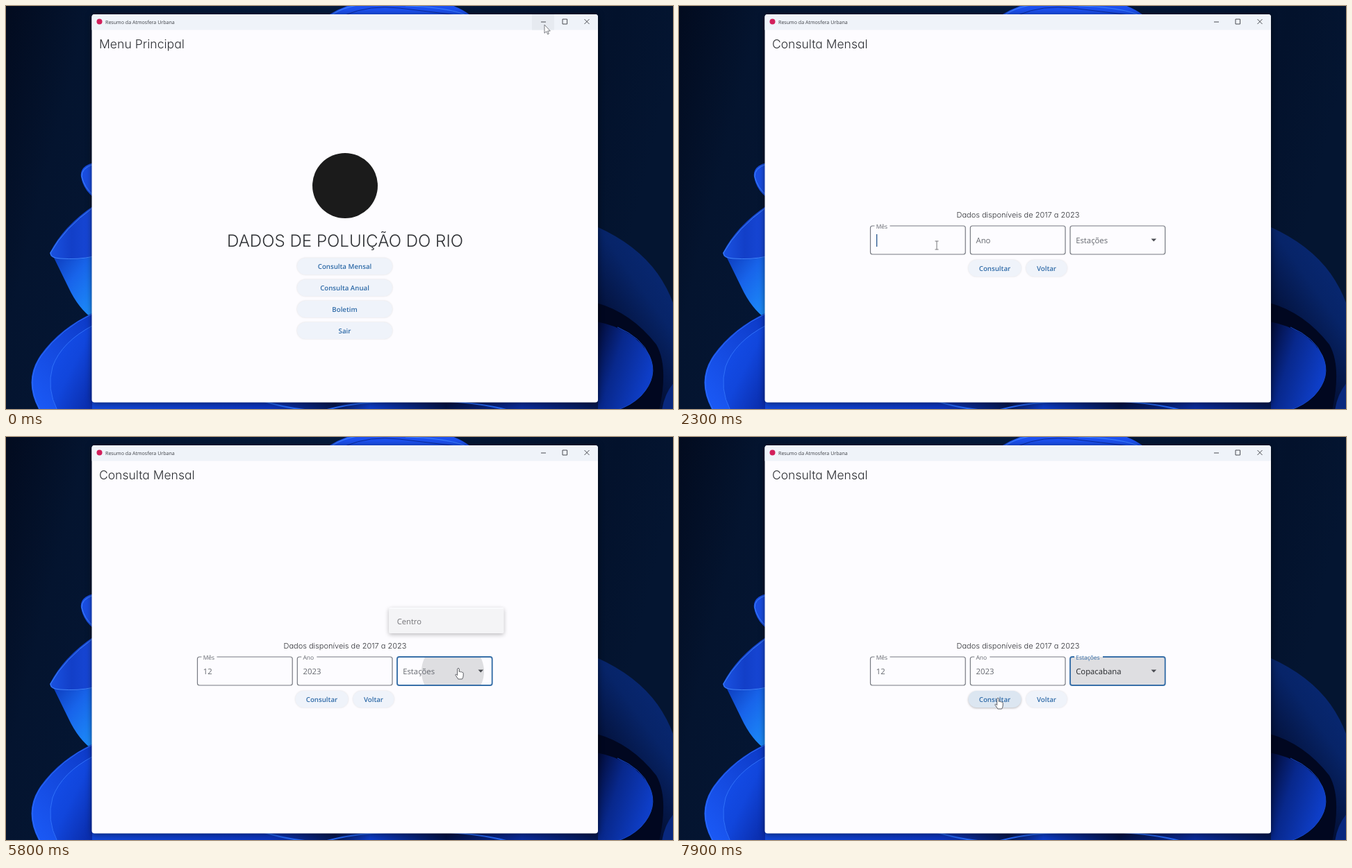
An HTML page for the animation above (8000 ms loop, 960x581 px).

```html
<!DOCTYPE html>
<html lang="pt">
<head>
<meta charset="utf-8">
<title>Consulta Mensal</title>
<style>
html, body { margin: 0; width: 100%; height: 100%; overflow: hidden; background: #020c22; }
svg { display: block; width: 100%; height: 100%; }
text { font-family: "Open Sans", "Noto Sans", sans-serif; text-rendering: geometricPrecision; white-space: pre; }
.round { font-family: Inter, Lato, sans-serif; font-weight: 300; font-feature-settings: "cv11"; fill: #2e3034; }
.btn text { font-size: 9.7px; font-weight: 600; fill: #2f6ba8; text-anchor: middle; }
.btn rect { fill: #eff3fa; filter: drop-shadow(0 .8px .8px #0002); }
.btn.over rect { fill: #dce6f1; filter: drop-shadow(0 1px 1.5px #0004); }
.field { fill: none; stroke: #777a82; stroke-width: 1.2; }
.label, .value { font-size: 11.3px; fill: #65686f; }
#sheet { fill: #fcfcff; filter: drop-shadow(0 2px 3px #0006); }
.item text { font-size: 11.2px; fill: #2b2c30; }
#win { fill: #fdfcff; filter: drop-shadow(0 1px 4px #0008); }
</style>
</head>
<body>
<svg viewBox="0 0 960 581" preserveAspectRatio="none">
  <defs>
    <linearGradient id="night" x2="1" y2=".15">
      <stop stop-color="#020b1f"/><stop offset=".12" stop-color="#04142f"/>
      <stop offset=".5" stop-color="#051a3c"/><stop offset=".9" stop-color="#03122c"/>
      <stop offset="1" stop-color="#041531"/>
    </linearGradient>
    <linearGradient id="petal" x1="1" y1="0" x2=".2" y2="1">
      <stop stop-color="#0c38c4"/><stop offset=".5" stop-color="#1449de"/><stop offset="1" stop-color="#1a58f4"/>
    </linearGradient>
    <linearGradient id="cup" x2="1" y2="1">
      <stop stop-color="#1550ee"/><stop offset=".5" stop-color="#1146dc"/><stop offset="1" stop-color="#0929a4"/>
    </linearGradient>
    <linearGradient id="brim" x2="1" y2="0">
      <stop stop-color="#1a52e2"/><stop offset=".5" stop-color="#123fc8"/><stop offset="1" stop-color="#1848d8"/>
    </linearGradient>
    <linearGradient id="fold" x2=".8" y2="1">
      <stop stop-color="#0d3cbc"/><stop offset=".45" stop-color="#1864ea"/><stop offset="1" stop-color="#1c8cfa"/>
    </linearGradient>
    <linearGradient id="deep" x1=".8" y1="0" x2=".2" y2="1">
      <stop stop-color="#092a78"/><stop offset=".35" stop-color="#072468"/><stop offset=".8" stop-color="#020a28"/>
    </linearGradient>
    <linearGradient id="lobe" x2="1" y2=".5">
      <stop stop-color="#020930"/><stop offset=".45" stop-color="#08288c"/><stop offset="1" stop-color="#0e3ec8"/>
    </linearGradient>
    <linearGradient id="floor">
      <stop stop-color="#1246d4"/><stop offset=".35" stop-color="#0d35be"/><stop offset=".48" stop-color="#06174f"/>
      <stop offset=".55" stop-color="#0d3cc8"/><stop offset=".7" stop-color="#041245"/>
      <stop offset=".85" stop-color="#0b2c9c"/><stop offset="1" stop-color="#05174e"/>
    </linearGradient>
    <clipPath id="dropClip"><rect x="563" y="317" width="136.5" height="41" rx="3"/></clipPath>
  </defs>

  <rect width="960" height="581" fill="url(#night)"/>
  <g id="bloom">
    <path d="M464 13Q480 3 500-3H636Q655 3 668 13Z" fill="#1c50ee"/>
    <path d="M488 13Q524-2 566 3T648 13" fill="none" stroke="#0a2a9c"/>
    <path d="M470 12Q486 2 506-1M575 0Q628 1 660 12" fill="none" stroke="#3a7dff" stroke-width="1.2"/>
    <path d="M126 226Q106 231 108 246Q111 264 126 276Z" fill="#1a4de0"/>
    <path d="M126 228Q108 234 109 246Q113 262 126 273" fill="none" stroke="#3e85ff"/>
    <path d="M68 361L126 361V452Q104 436 90 406Z" fill="url(#fold)"/>
    <path d="M126 288Q83 317 63 356Q64 364 76 365Q104 367 126 361Z" fill="url(#brim)"/>
    <path d="M126 290Q84 320 64 356Q64 363 78 364Q104 366 126 361" fill="none" stroke="#4086fa"/>
    <path d="M126 442Q78 464 50 503Q24 540 48 583H126Z" fill="url(#petal)"/>
    <path d="M126 460Q80 484 67 520Q58 552 74 583H126Z" fill="url(#cup)"/>
    <path d="M126 443Q79 465 51 504Q26 540 49 582M126 460Q80 484 67 520Q58 552 74 583" fill="none" stroke="#2f70fa"/>
    <path d="M850 318Q908 344 938 386Q956 412 964 440V583H850Z" fill="url(#deep)"/>
    <path d="M850 428Q900 442 936 488Q954 520 940 583H850Z" fill="#010720"/>
    <path d="M850 455Q906 466 926 504Q940 534 914 562Q900 576 878 583H850Z" fill="url(#lobe)"/>
    <path d="M880 463Q915 478 926 504Q940 534 914 562Q900 576 878 583" fill="none" stroke="#1546c4"/>
    <path d="M944 583Q948 556 964 540V583Z" fill="#09287e"/>
    <rect x="124" y="570" width="728" height="11" fill="url(#floor)"/>
    <path d="M372 570Q400 579 430 582M462 582Q500 572 548 570M640 570Q690 574 720 582" fill="none" stroke="#2465f2" stroke-width="2"/>
  </g>

  <rect id="win" x="123.5" y="12" width="728.5" height="559.5" rx="4"/>
  <path d="M123.5 34.5V16a4 4 0 0 1 4-4H848a4 4 0 0 1 4 4V34.5Z" fill="#eff3f9"/>
  <rect id="minHover" x="757" y="12" width="32" height="22.5" fill="#e6eaf0"/>
  <circle cx="134.5" cy="22.5" r="4" fill="#d21f5b"/>
  <text x="143" y="25.6" font-size="7.1" fill="#3c3f45">Resumo da Atmosfera Urbana</text>
  <path d="M770 23h7M801 19h6.6v7H801zM832.5 19l7 7m0-7l-7 7" fill="none" stroke="#4b4d52"/>

  <g id="home">
    <text class="round" x="134" y="61" font-size="17.6">Menu Principal</text>
    <circle cx="488" cy="259" r="47" fill="#1b1b1b"/>
    <text class="round" x="488" y="347" font-size="24.1" text-anchor="middle">DADOS DE POLUIÇÃO DO RIO</text>
  </g>
  <g id="form">
    <text class="round" x="134" y="61" font-size="17.5">Consulta Mensal</text>
    <text class="round" x="488" y="305" font-size="11" text-anchor="middle">Dados disponíveis de 2017 a 2023</text>
    <g clip-path="url(#dropClip)"><circle id="ripple" cx="643" cy="338" fill="#dedee1"/></g>
    <path d="M679.5 335.5h7.6l-3.8 4z" fill="#4a4c52"/>
    <rect id="caret" y="329" width="1.3" height="18" fill="#28578f"/>
  </g>
  <g id="menu"><rect id="sheet" x="551" width="165.5" rx="2"/></g>

  <g id="pointer" stroke-linejoin="round">
    <path id="arrow" d="M0 0V12.2L2.8 9.6L4.7 13.8L6.4 13L4.6 9H8.3Z" fill="#fff" stroke="#6a6d73" stroke-width=".9"/>
    <path id="hand" d="M-1.3 1.2Q0-.8 1.3 1.2V5.4Q2.5 4.6 3.3 5.8Q4.6 5 5.3 6.3Q6.8 5.8 7.2 7.3V11Q7 14 5.5 16H-.2Q-2 13-4.2 10.2Q-3.9 8.6-2.6 9.4L-1.3 10.6Z" fill="#fff" stroke="#4c4f55" stroke-width=".9"/>
    <path id="beam" d="M-2.5-6H2.5M0-6V6M-2.5 6H2.5" fill="none" stroke="#77777b"/>
  </g>
</svg>

<script>
const LOOP = 8000, STEP = 100;
const $ = id => document.getElementById(id);
const clamp = v => Math.max(0, Math.min(1, v));
const mix = (a, b, p) => a + (b - a) * p;

function add(parent, tag, attrs, text) {
  const el = document.createElementNS('http://www.w3.org/2000/svg', tag);
  set(el, attrs);
  if (text) el.textContent = text;
  parent.append(el);
  return el;
}
function set(el, attrs) {
  for (const k in attrs) el.setAttribute(k, attrs[k]);
}
const show = (el, on) => set(el, { visibility: on ? 'visible' : 'hidden' });
const inside = (b, x, y) => x >= b.x && x <= b.x + b.w && y >= b.y && y <= b.y + b.h;

function button(page, x, y, w, text) {
  const el = add($(page), 'g', { class: 'btn' });
  add(el, 'rect', { x, y, width: w, height: 24, rx: 12 });
  add(el, 'text', { x: x + w / 2, y: y + 16 }, text);
  return { page, el, x, y, w, h: 24 };
}
const buttons = ['Consulta Mensal', 'Consulta Anual', 'Boletim', 'Sair']
  .map((name, i) => button('home', 419, 363.3 + 30.9 * i, 137, name));
buttons.push(button('form', 416.5, 366, 76, 'Consultar'), button('form', 499.5, 366, 59, 'Voltar'));

// gap = width of the border opening for the raised label
const fields = [['Mês', 275.5, 22], ['Ano', 419.3, 22], ['Estações', 563, 41]].map(([name, x, gap]) => ({
  x, y: 317, w: 136.7, h: 41, gap,
  border: add($('form'), 'path', { class: 'field' }),
  label: add($('form'), 'text', { class: 'label' }, name),
  value: add($('form'), 'text', { class: 'value', x: x + 8.2, y: 342 })
}));
const [month, year, station] = fields;
station.value.style.fill = '#26282c';
$('form').append($('caret'));

const items = ['Centro', 'Copacabana', 'São Cristóvão', 'Tijuca', 'Irajá', 'Bangu', 'Campo Grande', 'Pedra de Guaratiba']
  .map((name, i) => {
    const y = 247.5 + 35.35 * i;
    const el = add($('menu'), 'g', { class: 'item' });
    const back = add(el, 'rect', { x: 551, y, width: 165.5, height: 35.35 });
    add(el, 'text', { x: 562.7, y: y + 22.5 }, name);
    return { el, back, x: 551, y, w: 165.5, h: 35.35 };
  });

// time, x, y
const path = [
  [0, 775, 27], [900, 511, 382], [1000, 509, 370], [1400, 508, 368], [2100, 371, 345],
  [2900, 371, 345], [3400, 432, 347], [3900, 442, 341.5], [5200, 442, 341.5], [5700, 651, 333],
  [6200, 651, 333], [6600, 642, 306], [7200, 642, 306], [7900, 459, 376]
];
const keys = {
  month: [[2500, '1'], [3000, '12']],
  year: [[4600, '2'], [4700, '20'], [4900, '202'], [5000, '2023']],
  station: [[7200, 'Copacabana']]
};
const typed = (list, t) => list.reduce((s, [at, v]) => t >= at ? v : s, '');

function pointerAt(t) {
  let i = path.length - 1;
  while (path[i][0] > t) i--;
  const a = path[i], b = path[i + 1] || a;
  let p = b === a ? 0 : (t - a[0]) / (b[0] - a[0]);
  p = p * p * (3 - 2 * p);
  return [mix(a[1], b[1], p), mix(a[2], b[2], p)];
}

function drawField(f, text, up, focus) {
  const gap = up ? f.gap : 0, r = 3, w = f.w - 2 * r, h = f.h - 2 * r;
  set(f.border, {
    d: `M${f.x + 6 + gap} ${f.y}H${f.x + r + w}a3 3 0 0 1 3 3v${h}a3 3 0 0 1-3 3h${-w}a3 3 0 0 1-3-3v${-h}a3 3 0 0 1 3-3H${f.x + 6}`
  });
  f.border.style.stroke = focus ? '#386fa8' : '';
  f.border.style.strokeWidth = focus ? 1.9 : '';
  set(f.label, { transform: `translate(${f.x + 8.2} ${mix(342, 321, up)}) scale(${mix(1, .75, up)})` });
  f.label.style.fill = focus && up ? '#3d73ad' : '';
  f.value.textContent = text;
}

function drawMenu(t, x, y) {
  const open = t >= 5800 && t < 7300;
  $('menu').style.display = open ? '' : 'none';
  if (!open) return false;
  const start = t < 5900;
  set($('menu'), { opacity: start ? .65 : t >= 7200 ? .45 : 1 });
  set($('sheet'), start ? { y: 246, height: 37 } : { y: 241, height: 294.5 });
  items.forEach((it, i) => {
    const over = inside(it, x, y) && t >= 6000;
    const fill = i === 0 ? '#dcdcdf' : over ? (t >= 7100 ? '#dfdfe2' : '#f1f1f4') : 'none';
    set(it.back, { fill, opacity: start ? .4 : 1 });
    set(it.el, { opacity: i === 0 ? 1 : start ? 0 : clamp((t - 5800) / 100 - i * .13) });
  });
  return true;
}

function draw(t) {
  const [x, y] = pointerAt(t);
  const page = t < 1300 ? 'home' : 'form';
  show($('home'), page === 'home');
  show($('form'), page === 'form');
  show($('minHover'), inside({ x: 757, y: 12, w: 32, h: 23 }, x, y));

  const menuOpen = drawMenu(t, x, y);
  let kind = menuOpen ? 'hand' : 'arrow';
  for (const b of buttons) {
    const over = b.page === page && !menuOpen && inside(b, x, y);
    b.el.classList.toggle('over', over);
    if (over) kind = 'hand';
  }
  if (page === 'form' && !menuOpen) {
    if (inside(station, x, y)) kind = 'hand';
    if (inside(month, x, y) || inside(year, x, y)) kind = 'beam';
  }

  const rise = at => clamp((t - at + 100) / 200);
  const m = typed(keys.month, t), a = typed(keys.year, t);
  drawField(month, m, rise(2200), false);
  drawField(year, a, rise(4100), false);
  drawField(station, typed(keys.station, t), rise(7200), t >= 5700);
  set($('ripple'), { r: t < 5700 ? 0 : t < 5800 ? 20 : t < 5900 ? 45 : 100 });

  const inMonth = t >= 2200 && t < 3500, inYear = t >= 4100 && t < 5500;
  show($('caret'), inMonth || inYear);
  set($('caret'), { x: inYear ? 428 + 6.46 * a.length : 284 + 6.46 * m.length });

  const typing = t >= 2500 && t < 3000 || t >= 4700 && t < 5300;
  for (const k of ['arrow', 'hand', 'beam']) show($(k), k === kind && !typing);
  set($('pointer'), { transform: `translate(${x} ${y})` });
}

const begin = performance.now();
function tick() {
  const t = (performance.now() - begin) % LOOP;
  draw(Math.floor(t / STEP) * STEP);
  requestAnimationFrame(tick);
}
tick();
</script>
</body>
</html>
```
